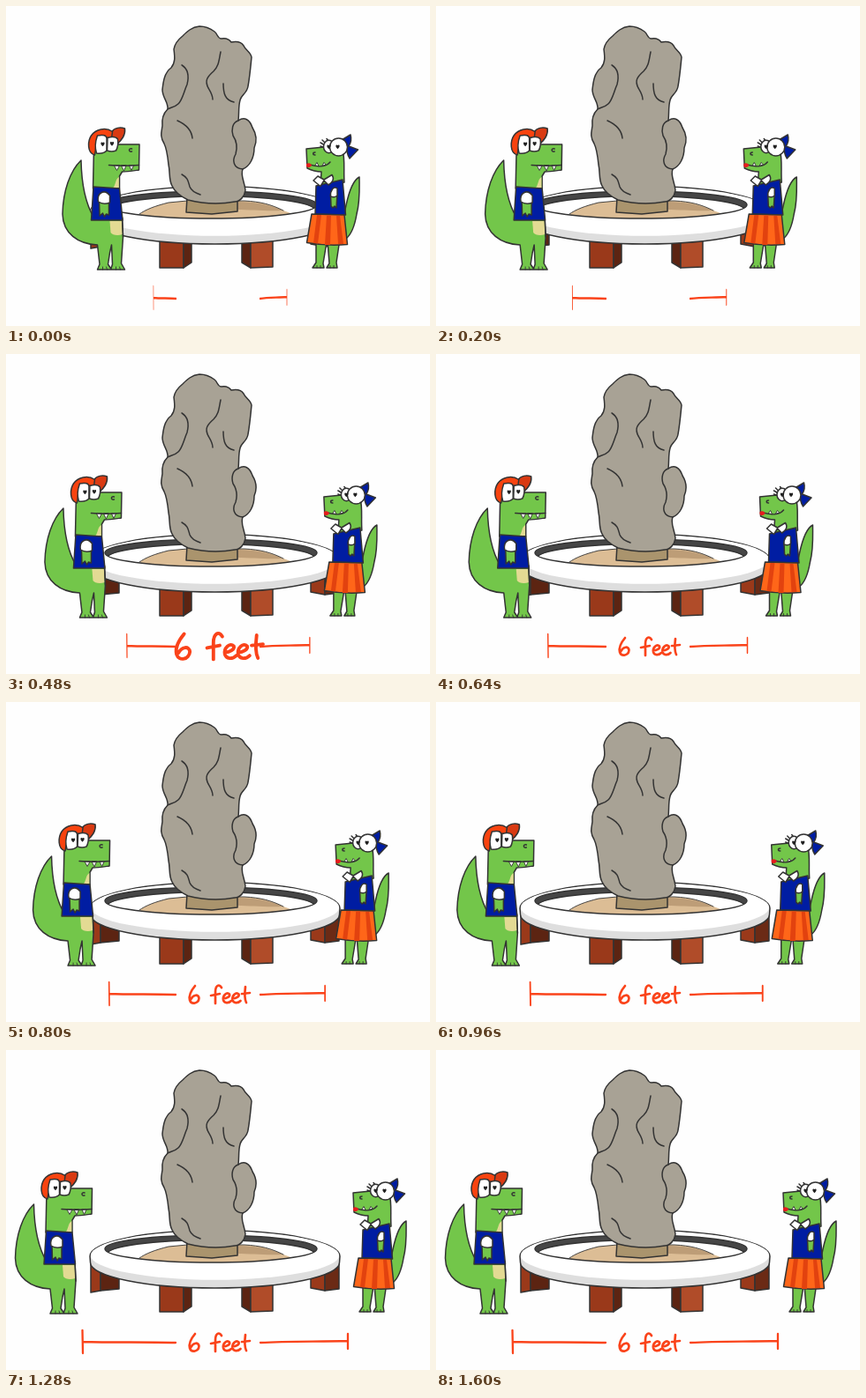
Recreate the animation shown at these times as an HTML page. Size 480 by 363 pixels, loop 1.92 s.

```html
<!DOCTYPE html>
<html lang="en">
<head>
<meta charset="utf-8">
<title>6 feet</title>
<style>
/* --go: how far apart the pair is, --pop: size of the lettering */
@property --go { syntax: "<number>"; inherits: true; initial-value: 0; }
@property --pop { syntax: "<number>"; inherits: true; initial-value: 0; }

html, body { margin: 0; width: 100%; height: 100%; overflow: hidden; background: #fefefe; }
svg { display: block; width: 480px; height: 363px; }
.ink { stroke: #333; stroke-width: 1.5; stroke-linejoin: round; stroke-linecap: round; }
.line { fill: none; }
.thin { stroke-width: .9; }
.flat { stroke: none; }
.green { fill: #73c64a; }
.white { fill: #fff; }
.blue { fill: #001da2; }
.red { fill: #f8430f; }
.dark { fill: #d93a12; }
.cream { fill: #e3da93; }
.mark { fill: none; stroke: #fa431a; stroke-width: 2.3; stroke-linecap: round; stroke-linejoin: round; }
.label { stroke-width: 2.7; }

/* Everything advances in 40 ms steps of a 1920 ms loop. */
svg { animation: go 1920ms infinite, pop 1920ms infinite; }
.left { transform: translateX(calc(53.5px - 53.5px * var(--go))); }
.right { transform: translateX(calc(53px * var(--go) - 53px)); }
.ruleL { transform: scaleX(calc(.245 + .755 * var(--go))); transform-origin: 193px 332px; }
.ruleR { transform: scaleX(calc(.31 + .69 * var(--go))); transform-origin: 287px 331px; }
.label { transform: scale(var(--pop)); transform-origin: 242px 332px; }
.lid { opacity: 0; animation: blink 1920ms step-end infinite; }
@keyframes go {
  0% { --go: 0; animation-timing-function: steps(32); }
  66.666%, 100% { --go: 1; }
}
@keyframes pop {
  0%, 14.583% { --pop: 0; animation-timing-function: steps(5); }
  24.999% { --pop: 1.44; animation-timing-function: steps(4); }
  33.333%, 100% { --pop: 1; }
}
@keyframes blink {
  0% { opacity: 0; }
  77.083% { opacity: 1; }
  83.333%, 100% { opacity: 0; }
}
</style>
</head>
<body>
<svg viewBox="0 0 480 363">
  <defs>
    <path id="heart" d="M0 2.800C-3.600-.4-1.900-3.200 0-1.400C1.900-3.200 3.600-.4 0 2.800Z" fill="#222"/>
    <clipPath id="basin"><ellipse cx="232" cy="225.500" rx="120" ry="15.500"/></clipPath>
  </defs>

  <!-- Table legs -->
  <g class="ink">
    <path fill="#9a391a" d="M96 240H107V273L96 275Z"/>
    <path fill="#5c2412" d="M107 245H128V271L107 273Z"/>
    <path fill="#9a391a" d="M174 260H201V297H174Z"/>
    <path fill="#5c2412" d="M201 260H210V291L201 297Z"/>
    <path fill="#5c2412" d="M267 260H277V297L267 291Z"/>
    <path fill="#b04c29" d="M277 260H302V296L277 297Z"/>
    <path fill="#9a391a" d="M345 250H361V273L345 270Z"/>
    <path fill="#6b2a15" d="M361 245L377 240V271L361 273Z"/>
  </g>

  <!-- Ring and sand -->
  <path class="ink" fill="#dedede" d="M95 234A141.500 29.500 0 0 1 378 234L377.500 241A141 29 0 0 1 95.500 241Z"/>
  <ellipse class="white" cx="236.500" cy="233" rx="140.700" ry="27.700"/>
  <g clip-path="url(#basin)">
    <rect x="110" y="205" width="245" height="40" fill="#464646"/>
    <ellipse class="ink white" cx="232" cy="232" rx="118" ry="16.500"/>
    <path fill="#dcbd95" d="M151 236C158 231 168 227 184 223L205 221H270C288 222 300 225 314 232L325 236L290 245H170Z"/>
    <path fill="#bd9d77" d="M262 222C283 222 301 226 313 232C295 233 276 231 262 231Z"/>
    <path class="ink line thin" d="M151 236C158 231 168 227 184 223L205 221H270C288 222 300 225 314 232"/>
  </g>
  <ellipse class="ink line" cx="232" cy="225.500" rx="120" ry="15.500"/>
  <path class="ink" fill="#aa946d" d="M205 217H262V233L233 236L204 234Z"/>

  <!-- Rock -->
  <path class="ink" fill="#a8a295" d="M219 23C226 23 232 26 236 29C240 32 239 37 244 37C249 36 252 37 255 41C260 40 266 40 269 45C271 50 277 52 278 58C277 68 276 80 274 91C273 99 266 101 265 107C263 113 264 121 263 130C270 125 276 129 279 138C284 146 284 154 281 161C281 172 276 182 268 185C265 192 270 199 271 209C270 216 265 222 259 222C242 225 222 224 206 220C198 216 191 211 188 204C184 197 186 188 184 180C183 170 182 162 179 156C174 148 176 143 177 136C176 127 178 122 183 117C184 109 177 104 177 95C178 86 179 76 187 70C192 64 191 57 190 49C191 43 195 38 200 34C205 29 210 24 219 23Z"/>
  <g class="ink line">
    <path d="M199 67C207 72 207 81 205 89C201 98 200 106 195 111C191 115 186 115 183 117"/>
    <path d="M243 52C241 62 241 68 235 74C227 81 225 85 229 93C232 98 234 101 234 106"/>
    <path d="M246 88C246 99 248 107 258 109"/>
    <path d="M194 130C203 134 210 140 211 150"/>
    <path d="M263 130C256 132 255 141 257 147C261 153 262 161 260 168C256 175 257 184 268 185"/>
    <path d="M199 191C206 195 206 198 208 205C210 210 214 212 220 214"/>
  </g>

  <!-- Left dinosaur -->
  <g class="left">
    <g class="ink">
      <path class="green" d="M31.500 175C19 187 11 210 10.500 236C11 258 28 270 50 271L52.500 293L50 299H66L62 293L64 280L66 271L67 293L65 299H81L77 292L79 262L78 240H46C37 225 32 203 31.500 175Z"/>
      <path class="cream flat" d="M64 244H77.500L78.300 259C73 261 67 260 65 257Z"/>
      <path class="line" d="M78 240L79 262"/>
      <path class="line thin" d="M56 299V296M61 299L60 296M71 299V296M76 299L75 296"/>
      <path class="green" d="M46 160L75 157H97.500L97 186C90 187 84 188 78 188L75 193V207H45Z"/>
      <path class="cream flat" d="M74.300 194V206H68C71 202 70 197 74.300 194Z"/>
      <path class="blue" d="M45.500 205L75 207L78.500 243L43 243Z"/>
      <path class="green" d="M52 221L52.500 238L56 235L58 239L60 236L63 237V221Z"/>
      <path class="white" d="M51 222C49 212 58 207 64 215V223C59 225 54 224 51 222Z"/>
      <path class="white thin" d="M69 181L72 186.500L75 181ZM77 181L80 187L82.500 181ZM86 181L88.500 186.500L91 181Z"/>
      <path class="line" d="M63 180.500C74 181.500 85 181.500 97 180.500M89 165C85 166 85 161 89 162"/>
      <path class="dark" d="M66 143C69 138 76 137 81 139C82 147 77 152 73 156L65 150Z"/>
      <path class="red" d="M47 169C38 167 39 153 43 147C48 140 59 137 67 142.500L66 150L50 148Z"/>
      <path class="white" d="M50 147Q60 145 60.500 150V164Q57 168 49 167Q46 158 50 147Z"/>
      <path class="white" d="M61.500 149.500Q70 147 73 151Q74 159 71 164Q66 166 61 164Z"/>
    </g>
    <use href="#heart" x="56" y="156.500"/>
    <use href="#heart" x="66.500" y="156"/>
    <g class="ink lid">
      <path class="green" d="M50 147Q60 145 60.500 150V164Q57 168 49 167Q46 158 50 147Z"/>
      <path class="green" d="M61.500 149.500Q70 147 73 151Q74 159 71 164Q66 166 61 164Z"/>
    </g>
  </g>

  <!-- Right dinosaur -->
  <g class="right">
    <g class="ink">
      <path class="green" d="M453 194C445 198 441 212 438 226L435 240V264H438C444 259 448 248 450 236C454 221 453 207 453 194Z"/>
      <path class="green" d="M404 264L404 291L400 297H413L412 292L416 268Z"/>
      <path class="green" d="M417 266L419 292L416 297H428L427 291L431 264Z"/>
      <path class="line thin" d="M405 297V294.500M409 297V294.500M420 297V294.500M424 297V294.500"/>
      <path class="green" d="M393 162L413 160L434 163C437 174 435 186 436 200L409 205L410 188C404 188 398 186 394 184Z"/>
      <path class="blue" d="M404 204L434 197L437.500 237L403 236Z"/>
      <path class="white" d="M401 198L406 193L413 197L422 191.500C425 196 423 200 418 203L413 198L409 204.500Z"/>
      <path class="green" d="M420.500 214L421 227L423 229L425 227L427 229L428 213Z"/>
      <path class="white" d="M420.500 216C420 209 424 204 428 207V215C426 217 423 217 420.500 216Z"/>
      <path fill="#ff6619" d="M399 236L436 237L439.500 270.500C423 272 408 271 393.500 268.500Z"/>
      <path class="flat" fill="#e2420f" d="M405 237L410 237L406 269.500L401 269ZM416 237.500H421L420 271H414ZM427 238H431L435 270H429Z"/>
      <path class="white thin" d="M403 180.500L405 177.500L407 181.500ZM411 181L413 177.500L415 180Z"/>
      <path class="line" d="M397 180C405 182.500 415 183 420 177M403 169C400 169 400 166 403 166"/>
      <path class="flat" fill="#e51d1d" d="M393 179C396 177 399 179 399 181C397 184 394 183 393 182Z"/>
      <path class="blue" d="M433 152L443 146Q445 153 441 159L451.500 163L442 173Q438 166 439 159Z"/>
      <path class="line" d="M414 158L409 155M415 156L411 152M418 153L416 150.500M414 161L409 159"/>
      <ellipse class="white" cx="418.500" cy="159.500" rx="6" ry="7.200"/>
      <circle class="white" cx="429.500" cy="160" r="10"/>
    </g>
    <use href="#heart" x="418.500" y="159.500"/>
    <use href="#heart" x="428.500" y="159.500"/>
    <g class="ink lid">
      <ellipse class="green" cx="418.500" cy="159.500" rx="6" ry="7.200"/>
      <circle class="green" cx="429.500" cy="160" r="10"/>
    </g>
  </g>

  <!-- Measure -->
  <path class="mark ruleL" d="M86.500 318L87 344M87 331C120 332 160 331 192 332"/>
  <path class="mark ruleR" d="M387 322V339M288 332C320 330 355 331 386 330"/>
  <g class="mark label" role="img" aria-label="6 feet">
    <path d="M214 322C209 328 207 334 208 338C210 344 218 342 218.500 336C218 331 212 332 209.500 337"/>
    <path d="M244 324C241 319 237 322 237 329V342M232 333L242 331"/>
    <path id="e" d="M246 336.500C250 336.500 254 334 253 331.500C250 328.500 245 333 246 338C247 342 252 342 255 339"/>
    <use href="#e" x="10.500"/>
    <path d="M271 323C270 331 270 337 272 341M267 331L276 330"/>
  </g>
</svg>
</body>
</html>
```
